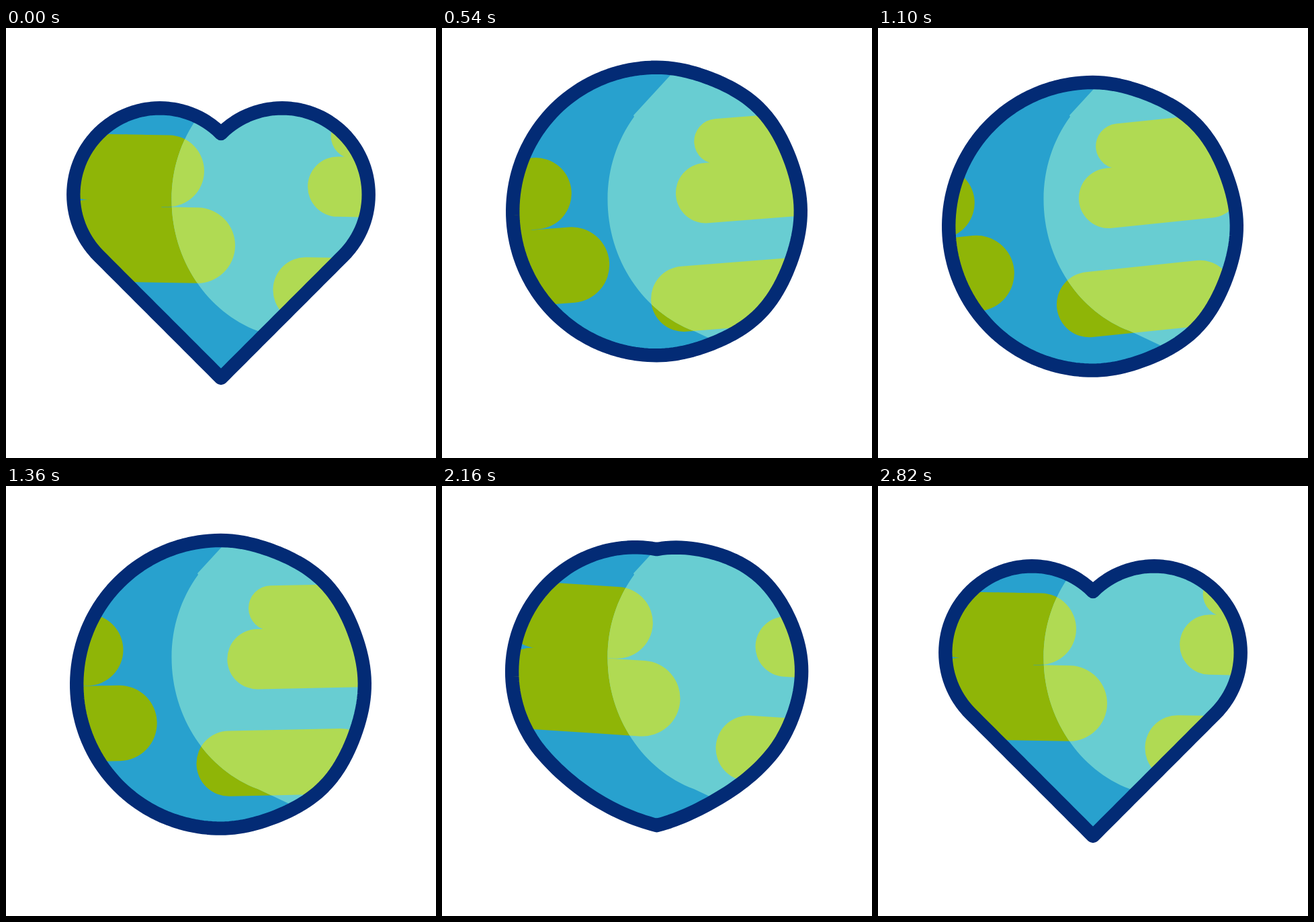
Write an HTML page with a canvas that moves like this. It is 640x640 px and loops after 3.16 s.

```html
<!DOCTYPE html>
<html lang="en">
<head>
<meta charset="utf-8">
<title>Earth and heart</title>
<style>
  html, body { margin: 0; height: 100%; overflow: hidden; background: #fff; }
  canvas { display: block; }
</style>
</head>
<body>
<canvas id="stage" width="640" height="640"></canvas>
<script>
const ctx = document.getElementById('stage').getContext('2d');
const LOOP = 3160;
const { PI, sin, cos } = Math;
const mix = (a, b, f) => a + (b - a) * f;

// Easing
const inOut = p => u => u < .5 ? (2 * u) ** p / 2 : 1 - (2 - 2 * u) ** p / 2;
const smooth = inOut(2), strong = inOut(3);
const fall = u => u * u, rebound = u => 1 - (1 - u) ** 3;
const ramp = (t, from, to, curve = smooth) =>
  curve(Math.min(1, Math.max(0, (t - from) / (to - from))));

// Motion: 0 is the heart, 1 the globe
const roundness = t => ramp(t, 0, 400) - ramp(t, 2010, 2420);

const hop = t => -37 * ramp(t, 0, 420) + 73 * ramp(t, 420, 690, fall)
  - 36 * ramp(t, 690, 960, rebound) - 55 * (ramp(t, 2080, 2390) - ramp(t, 2390, 2690));

const slide = t => -140.5 * ramp(t, 0, 915) + 157.5 * ramp(t, 1090, 1900, strong)
  - 17 * ramp(t, 1900, 2640, strong);

const tilt = t => 1 - 8 * ramp(t, 0, 900) + 11.6 * ramp(t, 900, 1820) - 3.6 * ramp(t, 1820, 2820);

// Continents are overlapping pills
const land = new Path2D();
const pill = (left, right, top, bottom) =>
  land.roundRect(left, top, right - left, bottom - top, (bottom - top) / 2);
pill(-168, 10, -53.3, 45);
pill(-115, 53.3, -53.3, 53.3);
pill(-179, 20, 45, 166.3);
pill(-100, 101.3, 53.7, 166.3);
pill(241, 503, -90, -23);
pill(207.8, 448.7, -25.7, 63.7);
pill(158.8, 422.2, 124.8, 222.2);

const light = new Path2D(
  'M400 5L285 130L286 132C260 168 246.5 210 246.5 255C246.5 345 300 423 375 451L430 477L640 577V5Z');

// One side (1 right, -1 left), f from 0 at the top to 1 at the tip:
// the lobe fills the first two thirds, the straight edge the rest.
function outlinePoint(side, f, m) {
  const lobe = Math.min(1, f * 1.5), edge = Math.max(0, f * 3 - 2);
  const a = PI * (lobe - .75);
  const hx = (91 + 128.7 * cos(a)) * (1 - edge);
  const hy = mix(248 + 128.7 * sin(a), 521, edge);
  const c = PI * (-.5 + .71 * lobe + .29 * edge);
  // The globe's right side is drawn with slight corners
  const r = 214.3 + (side > 0 ? cos(8 * c) - cos(4 * c) : 0);
  return [320 - m / 2 + side * mix(hx, r * cos(c), m), mix(hy, 295.3 + r * sin(c), m)];
}

function outline(m, dy) {
  const path = new Path2D(), steps = 90;
  for (let i = -steps; i < steps; i++) {
    const side = i < 0 ? 1 : -1;
    const [x, y] = outlinePoint(side, 1 - Math.abs(i < 0 ? -i - steps : i - steps) / steps * 1, m);
    path.lineTo(x, y + dy);
  }
  path.closePath();
  return path;
}

function paintEarth(sea, ground, t) {
  const dx = slide(t);
  ctx.fillStyle = sea;
  ctx.fillRect(0, 0, 640, 640);
  ctx.save();
  ctx.translate(370 + dx, 310 - .224 * dx);
  ctx.rotate(tilt(t) * PI / 180);
  ctx.translate(-130, -95);
  ctx.fillStyle = ground;
  ctx.fill(land);
  ctx.restore();
}

function draw() {
  const t = performance.now() % LOOP;
  const shape = outline(roundness(t), hop(t));
  ctx.fillStyle = '#fff';
  ctx.fillRect(0, 0, 640, 640);
  ctx.save();
  ctx.clip(shape);
  paintEarth('#28a1ce', '#8fb507', t);
  ctx.clip(light);
  paintEarth('#68cdd2', '#b0da53', t);
  ctx.restore();
  ctx.strokeStyle = '#032b75';
  ctx.lineWidth = 20.4;
  ctx.lineJoin = 'round';
  ctx.stroke(shape);
  requestAnimationFrame(draw);
}
draw();
</script>
</body>
</html>
```
